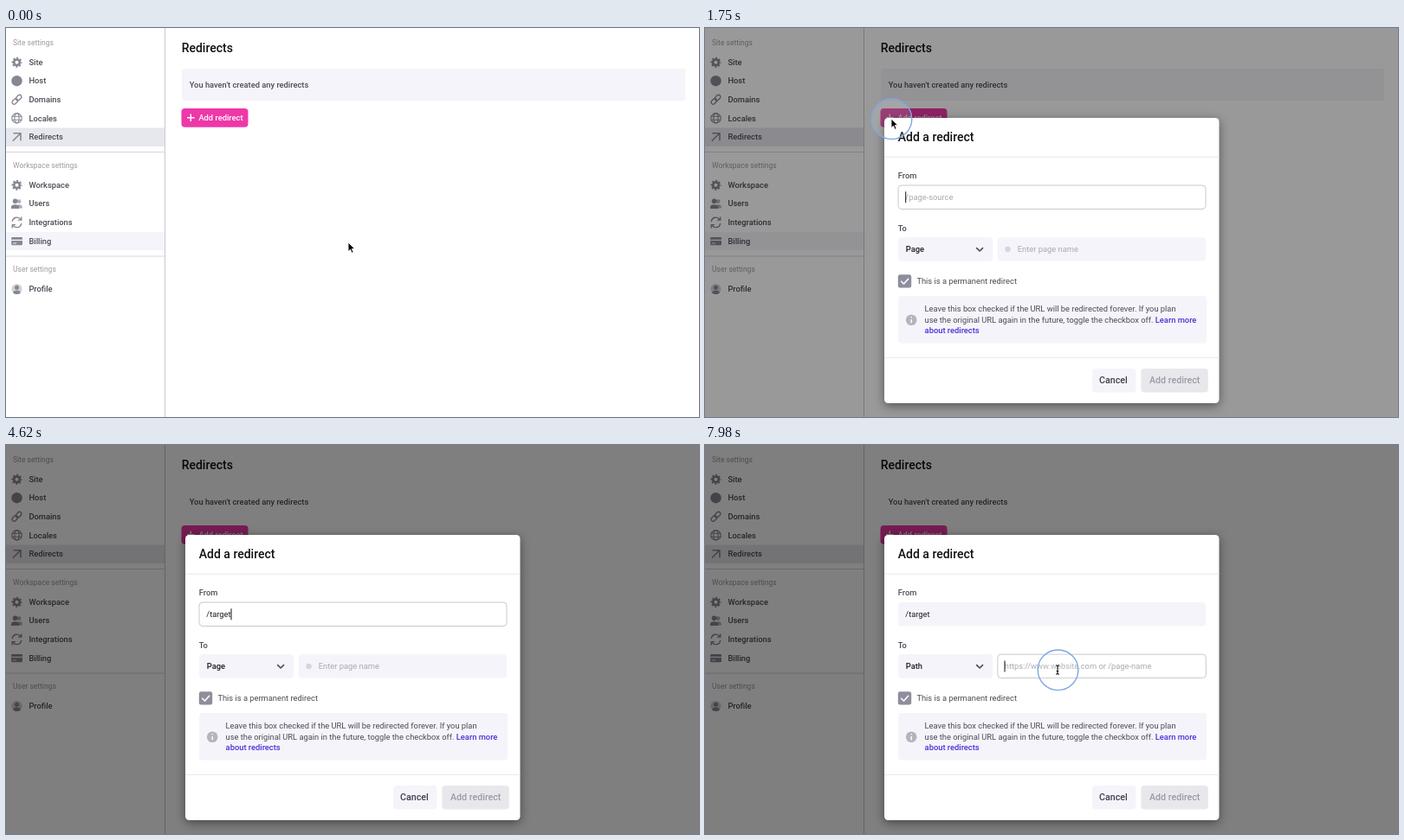
An HTML page that plays this animation: 800x450 px, repeating every 8 s.

```html
<!DOCTYPE html>
<html lang="en">
<head>
<meta charset="utf-8">
<title>Add a redirect</title>
<style>
  html, body { margin: 0; width: 100%; height: 100%; overflow: hidden; background: #fff; }
  svg { display: block; width: 800px; height: 450px; }
  text { font: 400 9.33px Roboto, Arial, sans-serif; fill: #4b4b55; white-space: pre; }
  .title { font-size: 14px; font-weight: 500; fill: #111; }
  .head { font-size: 8.5px; fill: #9b9ba4; }
  .med { font-weight: 500; }
  .dark { fill: #1c1c22; }
  .btn { font-size: 10.67px; font-weight: 500; text-anchor: middle; }
  .hint { fill: #a9a9b1; }
  .link { font-weight: 500; fill: #4a2fd6; }
  .soft { fill: #f4f4fa; }
  .line { stroke: #d6d6dc; }
  .icon { fill: #878793; }
  .draw { fill: none; stroke: #878793; stroke-width: 1.3; stroke-linecap: round; stroke-linejoin: round; }
  .check { fill: none; stroke-width: 1.6; stroke-linecap: round; stroke-linejoin: round; }
  #dialog { filter: drop-shadow(0 3px 6px rgba(0, 0, 0, .45)); }
  #menu { filter: drop-shadow(0 1px 3px rgba(0, 0, 0, .35)); }
</style>
</head>
<body>
<svg viewBox="0 0 800 450">
  <defs>
    <g id="gear">
      <circle r="3.3" fill="none" stroke="#878793" stroke-width="2.6"/>
      <circle r="5.1" fill="none" stroke="#878793" stroke-width="1.8" stroke-dasharray="2.1 1.905" stroke-dashoffset="1.05"/>
    </g>
  </defs>

  <g id="page">
    <rect width="800" height="450" fill="#fff"/>
    <rect y="115.5" width="183" height="21.5" fill="#e7e7ee"/>
    <rect id="hover" class="soft" y="236" width="183" height="21"/>
    <path class="line" d="M0 143.5H183M0 264H183"/>
    <path d="M183.5 0V450" stroke="#c9c9d0"/>

    <text class="head" x="8" y="19.8">Site settings</text>
    <text class="head" x="8" y="161.8">Workspace settings</text>
    <text class="head" x="8" y="282.3">User settings</text>
    <g id="items"></g>

    <use href="#gear" x="12.5" y="39.8"/>
    <circle class="icon" cx="12.5" cy="61.2" r="6.2"/>
    <g class="draw" transform="translate(12.5 82.8) rotate(-45)">
      <rect x="-6.7" y="-2.3" width="7.4" height="4.6" rx="2.3"/>
      <rect x="-.7" y="-2.3" width="7.4" height="4.6" rx="2.3"/>
    </g>
    <g class="draw" transform="translate(12.5 104.3)" style="stroke-width:1.1">
      <circle r="5.7"/><ellipse rx="2.6" ry="5.7"/><path d="M-5.4-2H5.4M-5.4 2H5.4"/>
    </g>
    <path class="draw" d="M8.3 130.3L16.6 122M9 121.7H17V129.8" style="stroke-width:1.6"/>
    <use href="#gear" x="12.5" y="181.8"/>
    <g class="icon">
      <circle cx="15" cy="200.6" r="2.4" opacity=".65"/>
      <path d="M14 208.5V204.3Q18.8 203.6 18.8 207.2V208.5Z" opacity=".65"/>
      <circle cx="10.6" cy="200.3" r="2.8"/>
      <path d="M6 209V207.3Q6 204.2 10.6 204.2T15.2 207.3V209Z"/>
    </g>
    <path class="draw" d="M7.3 223.5A5.4 5.4 0 0 1 17 221.4M17.8 218.8V222.2H14.4M17.7 226.3A5.4 5.4 0 0 1 8 228.4M7.2 231V227.6H10.6"/>
    <g>
      <rect class="icon" x="6.2" y="242" width="12.8" height="9.2" rx="1.2"/>
      <path d="M6.2 245.4H19" stroke="#f4f4fa" stroke-width="1.3"/>
      <path d="M8 249H12" stroke="#f4f4fa" stroke-width=".9"/>
    </g>
    <circle cx="12.5" cy="302" r="6.1" fill="#d2d2d9"/>
    <circle class="icon" cx="12.5" cy="300.2" r="2.5"/>
    <path class="icon" d="M8.1 306.2Q8.6 303.6 12.5 303.6T16.9 306.2A6.1 6.1 0 0 1 8.1 306.2Z"/>

    <text class="title" x="202.7" y="28.4">Redirects</text>
    <rect id="panel" class="soft" x="203" y="47" width="581" height="37" rx="3"/>
    <text class="med" x="211.7" y="69.3">You haven't created any redirects</text>
    <rect x="202.5" y="93" width="77" height="21.7" rx="4" fill="#ee38a8"/>
    <path d="M209 103.8H217.6M213.3 99.5V108.1" stroke="#fff" stroke-width="1.4"/>
    <text class="med" x="222.4" y="106.8" style="fill:#fff">Add redirect</text>
  </g>

  <rect id="shade" width="800" height="450"/>

  <g id="dialog">
    <rect x="207" y="104" width="386.5" height="330" rx="4.5" fill="#fff"/>
    <path d="M207 149.2H593.5M207 381.3H593.5" stroke="#e8e8ed"/>
    <text class="title" x="222.7" y="130.5">Add a redirect</text>

    <text class="med" x="222.8" y="174.4">From</text>
    <rect id="from" x="223" y="182" width="355" height="27.5" rx="4"/>
    <text id="fromText" x="231.3" y="198.8"></text>

    <text class="med" x="222.8" y="234.6">To</text>
    <rect id="select" x="223" y="242" width="109" height="27.7" rx="4"/>
    <text id="kind" class="dark med" x="231.8" y="259"></text>
    <path class="check" d="M313.7 254.6L317.1 258L320.5 254.6" stroke="#4b4b55"/>
    <rect id="to" x="337.8" y="242.2" width="240.5" height="27.3" rx="4"/>
    <circle id="dot" cx="349.5" cy="256" r="3.2" fill="#d5d5dc"/>
    <text id="toText" class="hint" y="259"></text>
    <rect id="caret" width="1" height="13" fill="#111"/>

    <rect x="222.8" y="285.2" width="15.4" height="15.4" rx="2.5" fill="#8e8e9c"/>
    <path class="check" d="M226.7 293.2L229.5 296L234.6 290.3" stroke="#fff"/>
    <text x="244.4" y="295.9">This is a permanent redirect</text>

    <rect class="soft" x="223" y="310" width="356" height="54.5" rx="4"/>
    <circle cx="238.2" cy="337.7" r="6.3" fill="#b4b4be"/>
    <path d="M238.2 337V341.2M238.2 333.9V335.3" stroke="#fff" stroke-width="1.4"/>
    <text x="253.6" y="328.1">Leave this box checked if the URL will be redirected forever. If you plan</text>
    <text x="253.6" y="340.6">use the original URL again in the future, toggle the checkbox off. <tspan class="link">Learn more</tspan></text>
    <text class="link" x="253.6" y="353.1">about redirects</text>

    <rect class="soft" x="447" y="394" width="50.5" height="27.6" rx="4"/>
    <text class="btn" x="471.4" y="411.3" style="fill:#3f3f49">Cancel</text>
    <rect x="503.3" y="394" width="77.5" height="27.6" rx="4" fill="#e8e8ec"/>
    <text class="btn" x="542.2" y="411.3" style="fill:#9a9aa4">Add redirect</text>

    <g id="menu">
      <rect x="222.8" y="270" width="108.4" height="55" rx="3.5" fill="#fff"/>
      <rect id="pathRow" class="soft" x="222.8" y="298" width="108.4" height="21"/>
      <text class="dark med" x="231.8" y="289.6">Page</text>
      <path class="check" d="M313 287.2L315.6 289.8L321 283.9" stroke="#1c1c22"/>
      <text x="231.8" y="311.1">Path</text>
    </g>
  </g>

  <g id="pointer">
    <circle id="ring" r="23.3" fill="#fff" fill-opacity=".12" stroke="#7fa6e3" stroke-width="1.4"/>
    <path id="arrow" d="M0 0V10.6L2.5 8.3L4.2 12.3L6.1 11.5L4.4 7.6H7.7Z" fill="#000" stroke="#fff" stroke-width=".9"/>
    <path id="beam" d="M-2-5.3Q0-5.3 0-3.8Q0-5.3 2-5.3M0-3.8V3.8M-2 5.3Q0 5.3 0 3.8Q0 5.3 2 5.3M-1.2 1.6H1.2" fill="none" stroke="#111" stroke-width="1.1"/>
    <path id="hand" d="M-1.2 1.2Q-1.2 0 0 0T1.2 1.2V6.2Q2.6 5.2 3.6 6.7Q5 5.8 6 7.3Q8 6.8 8 8.8V12Q8 14 6.6 15.6V17H-1V15.6Q-3 13.6-4.8 10.4Q-5.4 8.7-4 8.6Q-2.8 8.6-1.2 10.6Z" fill="#fff" stroke="#111" stroke-width="1" stroke-linejoin="round"/>
  </g>
</svg>
<script>
const LOOP = 8000;
const $ = id => document.getElementById(id);
const show = (id, on) => $(id).style.display = on ? '' : 'none';
const clamp = v => Math.max(0, Math.min(1, v));
const ramp = (t, a, b) => clamp((t - a) / (b - a));
const ease = v => v * v * (3 - 2 * v);
const within = (t, a, b) => t >= a && t < b;

const items = [['Site', 42.8], ['Host', 64.4], ['Domains', 86], ['Locales', 107.5], ['Redirects', 129.2],
  ['Workspace', 184.8], ['Users', 206.4], ['Integrations', 228], ['Billing', 249.6], ['Profile', 305.2]];
$('items').innerHTML = items.map(([name, y]) => `<text class="med" x="26.4" y="${y}">${name}</text>`).join('');

// Pointer stops: time, x, y
const moves = [[70, 395, 248], [910, 225, 104.5], [1400, 225, 104.5], [1720, 215, 105], [2200, 215, 105],
  [2870, 266, 202], [5040, 266, 202], [5600, 290, 250], [6250, 290, 250], [6560, 288.5, 312],
  [7000, 288.5, 312], [7700, 407, 260]];
// Press start and end
const presses = [[1050, 1890], [2870, 3290], [5670, 5950], [6790, 7070], [7770, 8100]];
const keys = [3570, 3710, 3920, 4130, 4270, 4410, 4620];
const shapes = [[0, 'arrow'], [2730, 'beam'], [5320, 'hand'], [7280, 'beam']];

const OPEN = 1540, BLUR = 5670, MENU = 5880, PICK = 6930, FOCUS = 7770;

function pointerAt(t) {
  let i = 0;
  while (i < moves.length - 1 && t >= moves[i + 1][0]) i++;
  const a = moves[i], b = moves[i + 1] || a;
  const k = b === a ? 0 : ease(ramp(t, a[0], b[0]));
  return [a[1] + (b[1] - a[1]) * k, a[2] + (b[2] - a[2]) * k];
}

function field(id, focused) {
  $(id).setAttribute('fill', focused ? '#fff' : '#f4f4fa');
  $(id).setAttribute('stroke', focused ? '#c9c9d0' : 'none');
}

function drawPointer(t) {
  const [x, y] = pointerAt(t);
  $('pointer').setAttribute('transform', `translate(${x} ${y})`);
  show('pointer', !within(t, keys[0], 5040));
  const shape = shapes.filter(s => t >= s[0]).pop()[1];
  for (const id of ['arrow', 'beam', 'hand']) show(id, id === shape);
  const press = Math.max(...presses.map(([a, b]) => Math.min(ramp(t, a, a + 100), 1 - ramp(t, b - 100, b))));
  $('ring').setAttribute('opacity', press);
  $('ring').setAttribute('transform', `translate(.5 .3) scale(${.7 + .3 * press})`);
}

function drawForm(t) {
  const typed = '/target'.slice(0, keys.filter(k => t >= k).length);
  const from = $('fromText');
  from.textContent = typed || '/page-source';
  from.setAttribute('class', typed ? 'dark' : 'hint');
  field('from', t < BLUR);

  const isPath = t >= PICK, open = within(t, MENU, PICK), toFocus = t >= FOCUS;
  $('kind').textContent = isPath ? 'Path' : 'Page';
  $('select').setAttribute('fill', open ? '#e5e5ec' : '#f4f4fa');
  show('menu', open);
  show('pathRow', t >= 6440);
  show('dot', !isPath);
  field('to', toFocus);
  $('toText').textContent = isPath ? 'https://www.website.com or /page-name' : 'Enter page name';
  $('toText').setAttribute('x', isPath ? 345.8 : 360.8);

  show('caret', t < BLUR || toFocus);
  const end = typed ? from.getComputedTextLength() : 0;
  $('caret').setAttribute('x', toFocus ? 345.5 : 231.2 + end);
  $('caret').setAttribute('y', toFocus ? 249.5 : 189.3);
}

function render(t) {
  $('shade').setAttribute('opacity', .4 * ramp(t, OPEN, 1720) + .1 * ramp(t, 1750, 1890));
  const fade = 1 - ramp(t, 1800, 2200);
  $('panel').setAttribute('opacity', fade);
  $('hover').setAttribute('opacity', fade);
  show('dialog', t >= OPEN);
  $('dialog').setAttribute('opacity', ramp(t, OPEN - 40, 1700));
  drawForm(t);
  drawPointer(t);
}

const start = performance.now();
function tick() {
  render((performance.now() - start) % LOOP);
  requestAnimationFrame(tick);
}
tick();
</script>
</body>
</html>
```
